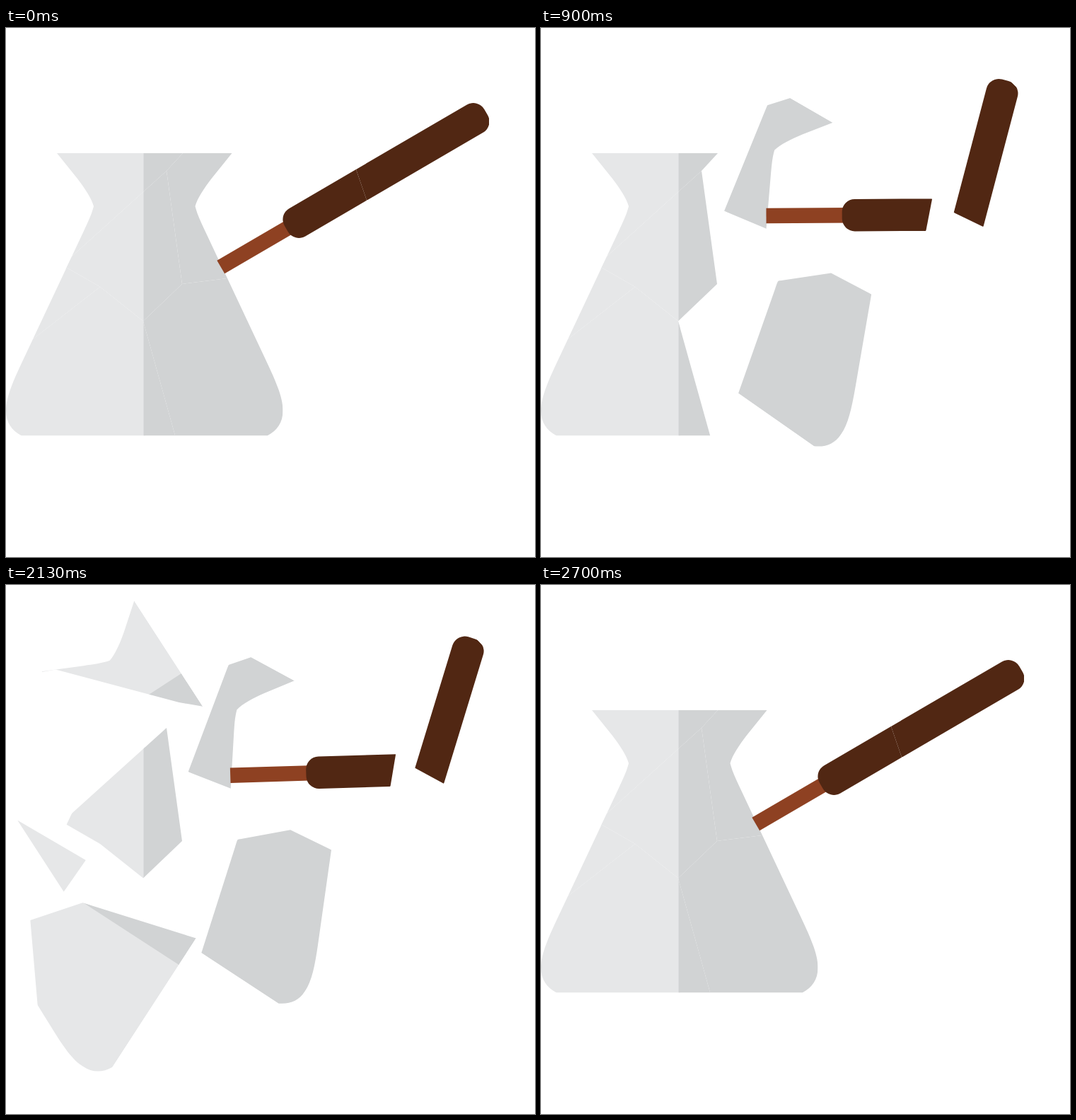
Recreate the animation shown at these times as an HTML page. Size 748 px wide and 748 px high, loop 2730 ms.

```html
<!DOCTYPE html>
<html lang="en">
<head>
<meta charset="utf-8">
<title>Coffee pot</title>
<style>
  html, body { margin: 0; width: 100%; height: 100%; overflow: hidden; background: #fff; }
  svg { display: block; width: 100vw; height: 100vh; }
</style>
</head>
<body>
<svg id="stage" viewBox="0 0 748 748">
  <defs>
    <path id="half" d="M72 177L101 213C111 226 121 241 124 252C121 264 116 274 110 287L30 457C12 495 0 520 0 541C0 558 8 569 22 576.5H197V177Z"/>
    <g id="pot">
      <use href="#half" fill="#e6e7e8"/>
      <use href="#half" fill="#d1d3d4" transform="matrix(-1 0 0 1 391.5 0)"/>
    </g>
    <g id="handle" transform="translate(384.8 264.2) rotate(-30.25)">
      <rect x="-107.2" y="12.2" width="120" height="21.5" fill="#8e4122"/>
      <rect width="327" height="45.5" rx="18" fill="#512713"/>
    </g>
  </defs>
</svg>
<script>
const LOOP = 2730, FRAME = 30, MOVE = 300, BACK = 2100, BACK_TIME = 600;

// Points shared by neighbouring cuts.
const lip = [250, 177], notch = [227, 202], bend = [249, 362], hip = [312.5, 354];
const navel = [194, 414.5], foot = [239.2, 576.5], knee = [133, 366], tip = [38, 440];
const hinge = [93, 323], side = [85.5, 341];
const splitTop = [495, 200], splitEnd = [510, 243.5];

// Back to front; the frontmost piece leaves first.
const pieces = [
  { cuts: { pot: [notch, bend, navel, knee, [80, 335.6], hinge] }, shift: [0, 0], turn: 0 },
  { cuts: { pot: [[38, 339], [86, 339], knee, tip] }, shift: [-24.3, -5.3], turn: 100 },
  { cuts: { pot: [[72, 177], lip, notch, hinge, side, [72, 341]] }, shift: [0, -123.5], turn: 60 },
  { cuts: { pot: [navel, foot, [0, 576.5], [0, 440], tip, knee] }, shift: [-4.5, 75], turn: -60 },
  { cuts: { pot: [bend, hip, [391.5, 354], [391.5, 576.5], foot, navel] }, shift: [94, -9.2], turn: 35 },
  { cuts: { pot: [lip, notch, bend, hip, [320, 354], [320, 177]],
            handle: [splitTop, splitEnd, [510, 350], [295, 350], [295, 200]] }, shift: [40.3, -31.1], turn: 30 },
  { cuts: { handle: [splitTop, splitEnd, [683, 243.5], [683, 105], [495, 105]] }, shift: [43, 2], turn: -45 },
];

const stage = document.getElementById('stage');

function add(parent, tag, attrs = {}) {
  const el = document.createElementNS('http://www.w3.org/2000/svg', tag);
  for (const key in attrs) el.setAttribute(key, attrs[key]);
  return parent.appendChild(el);
}

const middle = list => (Math.min(...list) + Math.max(...list)) / 2;

pieces.forEach((piece, i) => {
  const corners = Object.values(piece.cuts).flat();
  piece.centre = [0, 1].map(axis => middle(corners.map(p => p[axis])));
  piece.start = (pieces.length - 1 - i) * MOVE;
  piece.el = add(stage, 'g');
  for (const shape in piece.cuts) {
    const id = `cut-${shape}-${i}`;
    add(add(stage, 'clipPath', { id }), 'polygon', { points: piece.cuts[shape].join(' ') });
    const holder = add(piece.el, 'g', { 'clip-path': `url(#${id})` });
    add(holder, 'use', { href: '#' + shape });
  }
});

const clamp = x => Math.min(1, Math.max(0, x));

function draw(t) {
  for (const { el, start, centre, shift, turn } of pieces) {
    const k = clamp((t - start) / MOVE) - clamp((t - BACK) / BACK_TIME);
    const out = turn ? k : 0;
    el.setAttribute('transform',
      `translate(${shift[0] * out} ${shift[1] * out}) rotate(${turn * out} ${centre})`);
  }
}

const begin = performance.now();
function tick() {
  const t = (performance.now() - begin) % LOOP;
  draw(Math.floor(t / FRAME) * FRAME);
  requestAnimationFrame(tick);
}
draw(0);
requestAnimationFrame(tick);
</script>
</body>
</html>
```
